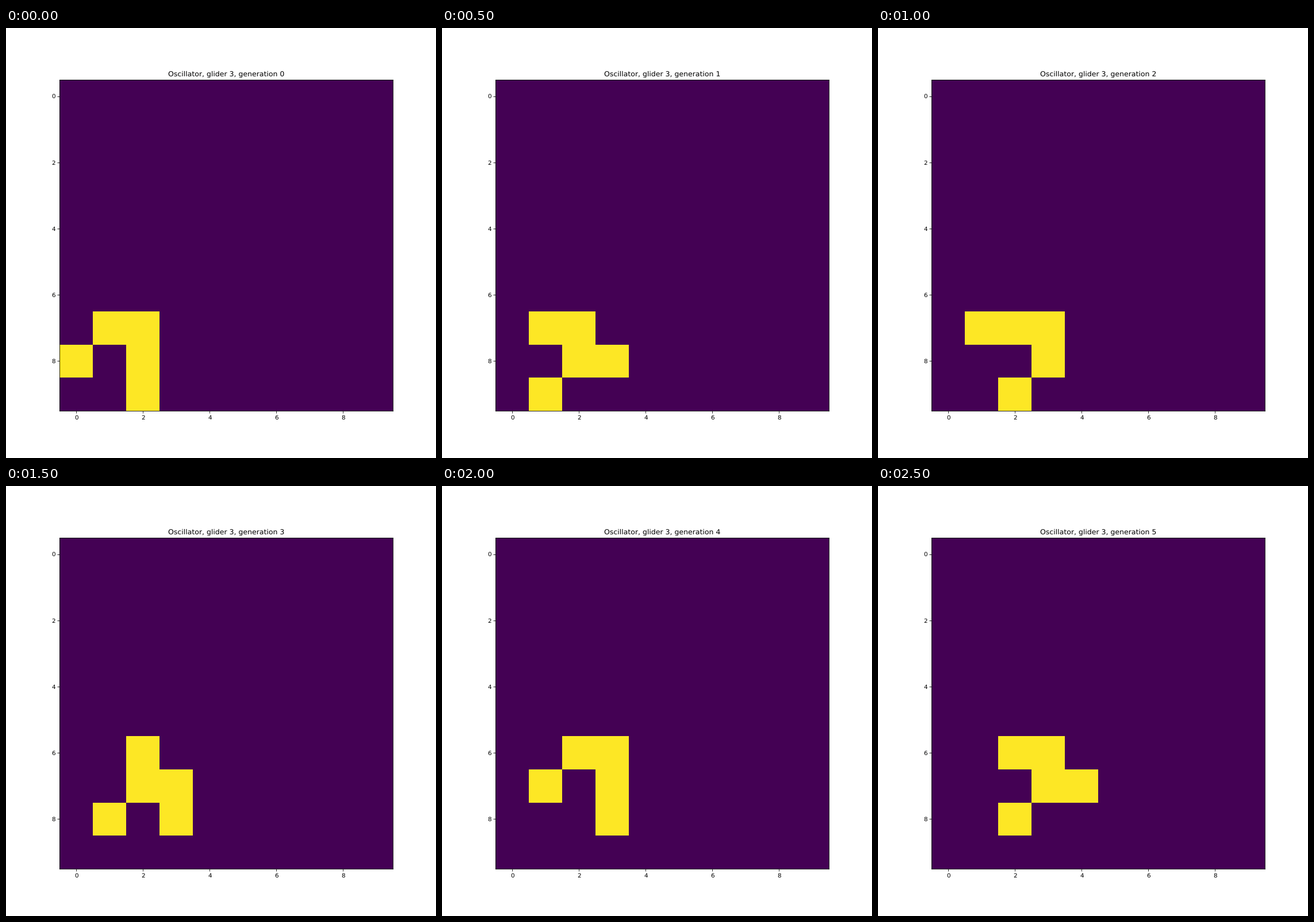
A matplotlib script for the animation above (3 s loop, 748 by 748 pixels).

```python
import numpy as np
import matplotlib.pyplot as plt
from matplotlib.animation import FuncAnimation

INCHES, DPI = 10, 74.8  # 748 px square
SIZE = 10
GENERATIONS = 6
START = [(7, 1), (7, 2), (8, 0), (8, 2), (9, 2)]  # (row, column)


def step(grid):
    """Apply one generation of the life rules on a wrapping grid."""
    shifts = [(dy, dx) for dy in (-1, 0, 1) for dx in (-1, 0, 1) if dy or dx]
    count = sum(np.roll(grid, s, axis=(0, 1)) for s in shifts)
    return ((count == 3) | ((grid == 1) & (count == 2))).astype(int)


first = np.zeros((SIZE, SIZE), dtype=int)
for cell in START:
    first[cell] = 1

grids = [first]
while len(grids) < GENERATIONS:
    grids.append(step(grids[-1]))

plt.rcParams.update({"font.family": "DejaVu Sans", "text.hinting": "none"})
fig, ax = plt.subplots(figsize=(INCHES, INCHES), dpi=DPI)
fig.subplots_adjust(left=0.1249, right=0.9, bottom=0.11, top=0.88)

# A mesh snaps every cell edge to the nearest pixel.
edges = np.arange(SIZE + 1) - 0.5
mesh = ax.pcolormesh(edges, edges, first, cmap="viridis", vmin=0, vmax=1)
ax.set(xlim=(edges[0], edges[-1]), ylim=(edges[-1], edges[0]))
title = ax.set_title("")


def update(n):
    mesh.set_array(grids[n])
    title.set_text(f"Oscillator, glider 3, generation {n}")
    return mesh, title


anim = FuncAnimation(fig, update, frames=GENERATIONS, interval=500,
                     repeat=True, repeat_delay=0)
plt.show()
```
